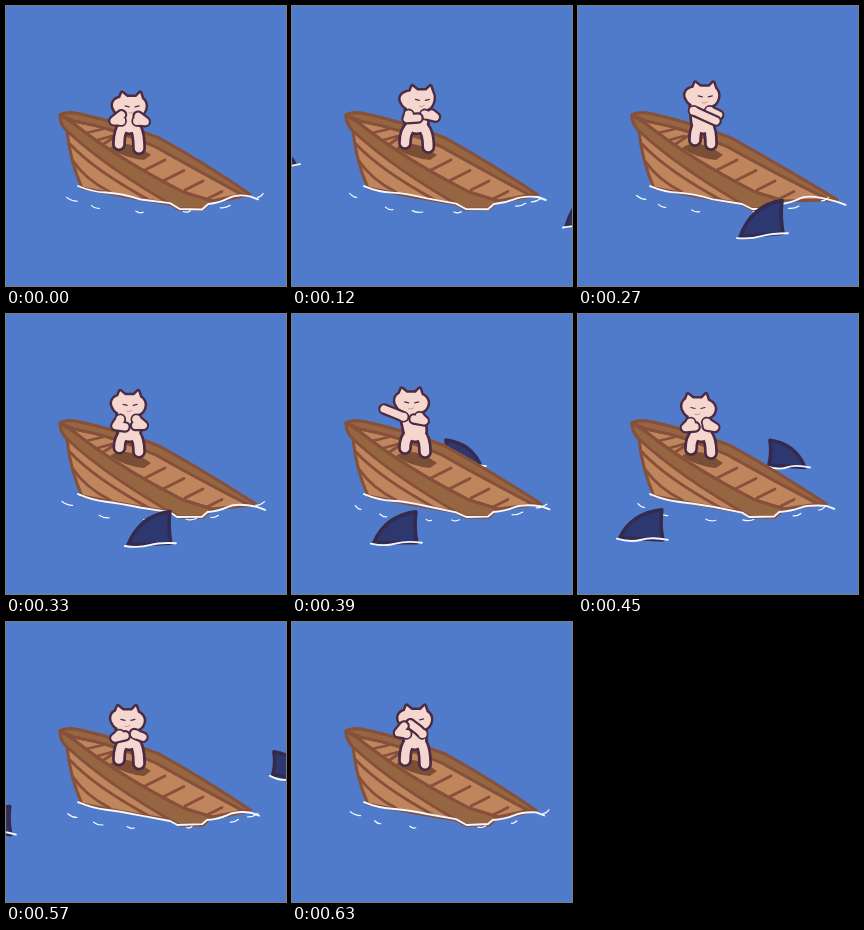
An HTML page that plays this animation: 280 by 280 pixels, repeating every 0.66 s.

```html
<!DOCTYPE html>
<html lang="en">
<head>
<meta charset="utf-8">
<title>Boat dance</title>
<style>
html, body { margin: 0; width: 100%; height: 100%; overflow: hidden; background: #507bca; }
svg { display: block; width: 100vw; height: 100vh; }
path { stroke-linecap: round; stroke-linejoin: round; }
.wood { fill: #bf855c; stroke: #87503a; stroke-width: 3; }
.rim { fill: #966642; }
.plank { fill: none; stroke: #87503a; stroke-width: 2.8; }
.foam { fill: none; stroke: #f4f8ff; }
.fin { fill: #2c386f; stroke: #35294c; stroke-width: 3.6; }
.ink { fill: none; stroke: #4b2b42; }
.skin { fill: none; stroke: #f5d7cf; }
.face { fill: #f5d7cf; }
</style>
</head>
<body>
<svg viewBox="0 0 280 280">
  <rect width="280" height="280" fill="#507bca"/>
  <g id="far"></g>
  <g id="boat"></g>
  <g id="cat"></g>
  <g id="water"></g>
  <g id="near"></g>
</svg>
<script>
const LOOP = 660, STEP = 30;
const el = id => document.getElementById(id);
const path = (d, cls, width) => `<path class="${cls}" d="${d}"${width ? ` stroke-width="${width}"` : ''}/>`;
const swing = (t, shift = 0) => Math.cos(2 * Math.PI * t / LOOP + shift);

// Smooth pulse around one moment, wrapping with the loop
function pulse(t, peak, width = 40) {
  const d = (t - peak + LOOP * 1.5) % LOOP - LOOP / 2;
  return Math.exp(-d * d / (width * width));
}

function random(seed) {
  return () => {
    seed = (seed * 16807 + 11) % 2147483647;
    return seed / 2147483647;
  };
}

// ---- boat and water ----
const tipX = t => 247 - 3 * swing(t) + 10 * pulse(t, 270);
const tipY = x => 188 + (x - 243) * .36;

function boat(t) {
  const x = tipX(t), y = tipY(x);
  const top = `M54 109Q60 105 74 108Q115 117 153 132Q200 158 ${x} ${y}`;
  const nearEdge = 'Q112 153 177 186L206 195';
  const hull = `${top}L224 193L203 197L197 203L173 203L164 198Q120 191 76 182Q64 155 61 125Q54 118 54 109Z`;
  const inside = `M68 115Q108 122 150 141Q198 168 ${x - 8} ${y}L206 195L177 186Q112 153 68 118Z`;
  const farRail = `${top}L${x - 8} ${y}Q198 168 150 141Q108 122 68 115Z`;
  const nearRail = `M54 109Q60 113 68 118${nearEdge}L197 203L173 203Q102 163 61 125Q54 118 54 109Z`;
  let planks = 'M88 135L106 130M80 127L97 123M96 139L113 128';
  for (let i = 0; i < 4; i++) planks += `M${159 + 19 * i} ${154 + 10.5 * i}l${2 * i - 22} ${11 - i}`;
  return path(hull, 'wood') + path(inside, 'wood') + path(planks, 'plank')
    + '<path d="M104 142Q120 131 145 149L138 154Q118 152 104 142Z" fill="#7b4e36"/>'
    + path(farRail, 'wood rim') + path(nearRail, 'wood rim')
    + path('M64 138Q88 164 143 194M67 155Q80 174 104 186', 'plank');
}

function water(t) {
  const rnd = random(101 + Math.floor(t / 60) * 977);
  const x = tipX(t), y = tipY(x) + 2;
  const w = () => rnd() * 2 - 1;
  const edge = `M72 ${181 + w()}Q86 186 100 ${187 + w()}T135 ${193 + w()}L164 ${198 + w()}L${173 + w() * 3} 203`
    + `L196 ${203 + w()}L${201 + w() * 2} 198Q213 197 222 ${193 + w()}T${x} ${y}l8 3`;
  let dashes = '';
  for (let i = 0; i < 6; i++) {
    const a = .15 + (i + rnd() * .6) * .48, len = 5 + rnd() * 6;
    const slope = Math.cos(a) * 4;
    dashes += `M${160 - 100 * Math.cos(a) - len / 2} ${184 + 22 * Math.sin(a)}q${len / 2} ${slope / 2 + 2} ${len} ${slope}`;
  }
  return path(edge, 'foam', 1.9) + path(dashes, 'foam', 1.2);
}

// ---- sharks: steady glide after a fast entry, along a shallow arc ----
const rush = t => Math.exp((120 - t) / 30);

function fin(x, top, w, h, t, dir) {
  const tilt = (t - 385) / 30;
  const ly = top + h - tilt / 2, ry = top + h + tilt / 2, rx = x + w;
  const [nose, noseY, back, backY] = dir > 0 ? [rx, ry, x, ly] : [x, ly, rx, ry];
  const peak = back + dir;
  const cx = peak + (nose - peak) * .72, cy = top + (noseY - top) * .12;
  const mid = x + w / 2, low = top + h;
  return path(`M${nose} ${noseY}Q${cx} ${cy} ${peak} ${top}Q${peak + dir * 2} ${(top + backY) / 2} ${back} ${backY}Z`, 'fin')
    + path(`M${x - 3} ${ly + 1}Q${x + w / 4} ${low + 4} ${mid} ${low + 1}T${rx + 5} ${ry}`, 'foam', 1.9);
}

const farFin = t => fin(20 + .633 * (t - 180) - 15 * rush(t), 126 + (t - 400) ** 2 / 7400, 36, 26, t, 1);
const nearFin = t => fin(342 - .667 * t + 12 * rush(t), 198 - (t - 370) ** 2 / 2950, 43, 43 - t / 32, t, -1);

// ---- cat ----
function arm(sx, sy, hx, hy, side) {
  const reach = Math.hypot(hx - sx, hy - sy) / 2;
  const bend = Math.sqrt(Math.max(0, 64 - reach * reach));
  const d = `M${sx} ${sy}L${(sx + hx) / 2 + side * bend} ${(sy + hy) / 2 + bend * .4}L${hx} ${hy}`;
  return path(d, 'ink', 11.6) + path(d, 'skin', 7.2) + path(`M${sx} ${sy}h0`, 'skin', 8);
}

function cat(t) {
  const p = peak => pulse(t, peak);
  const lean = 1.4 + 3.3 * swing(t, -1.4);
  const x = 122 + lean * .6 - 2 * p(390);
  const y = 97 + 5 * swing(t) - 5.5 * p(120) + 8 * p(180) - 2 * p(270) - 4 * p(390) - 5 * p(610);
  const footY = 138 + 2.3 * swing(t);
  const lx = 113 + 4 * p(270), rx = 133 + 3 * p(120) + 3 * p(180), mid = (lx + rx) / 2, hip = 116;

  const ear = x + lean;
  const head = `M${x - 15} ${y + 2}C${x - 18} ${y - 3} ${x - 15} ${y - 8} ${ear - 11} ${y - 9}`
    + `L${ear - 9} ${y - 14}L${ear - 4} ${y - 10}H${ear + 5}L${ear + 9} ${y - 14}L${ear + 11} ${y - 8}`
    + `C${x + 18} ${y - 4} ${x + 17} ${y + 2} ${x + 14} ${y + 6}C${x + 9} ${y + 12} ${x - 11} ${y + 12} ${x - 15} ${y + 2}Z`;
  const torso = `M${x} ${y + 11}L${mid} ${hip}`;
  const legs = `M${mid - 5} ${hip + 4}Q${lx} ${hip + 9} ${lx} ${footY - 2}M${mid + 5} ${hip + 4}Q${rx} ${hip + 9} ${rx} ${footY + 2}`;
  const body = (cls, pad) => path(legs, cls, 8.5 + pad) + path(torso, cls, 21 + pad);
  const eyes = `M${ear - 6} ${y - 1}l4 1M${ear + 4} ${y}l4 -1`;

  // Wave at 390, cover the face at 630, reach across at 270
  const left = [120 + 6 * p(120) + 18 * p(270) - 28 * p(390) - 8 * p(630),
    115 - 3 * p(120) - 20 * p(390) - 11 * p(630)];
  const right = [130 + 12 * p(10) + 9 * p(120) + 6 * p(180) + 4 * p(270) - 8 * p(390) - 16 * p(630),
    113 + 5 * p(10) - 5 * p(120) - 6 * p(270) - 8 * p(390) - 13 * p(630)];

  return body('ink', 5.4) + path(head, 'ink', 5) + body('skin', 0) + path(head, 'face')
    + path(eyes, 'ink', 1.2)
    + `<path d="M${ear - 2} ${y + 6}q3 1 5 -1" fill="none" stroke="#c79a99"/>`
    + arm(x + 8, y + 14, ...right, 1) + arm(x - 8, y + 14, ...left, -1);
}

const layers = { far: farFin, boat, cat, water, near: nearFin };

function draw(now) {
  const t = Math.floor(now % LOOP / STEP) * STEP;
  for (const id in layers) el(id).innerHTML = layers[id](t);
}

const start = performance.now();
function tick() {
  draw(Math.max(0, performance.now() - start));
  requestAnimationFrame(tick);
}
tick();
</script>
</body>
</html>
```
